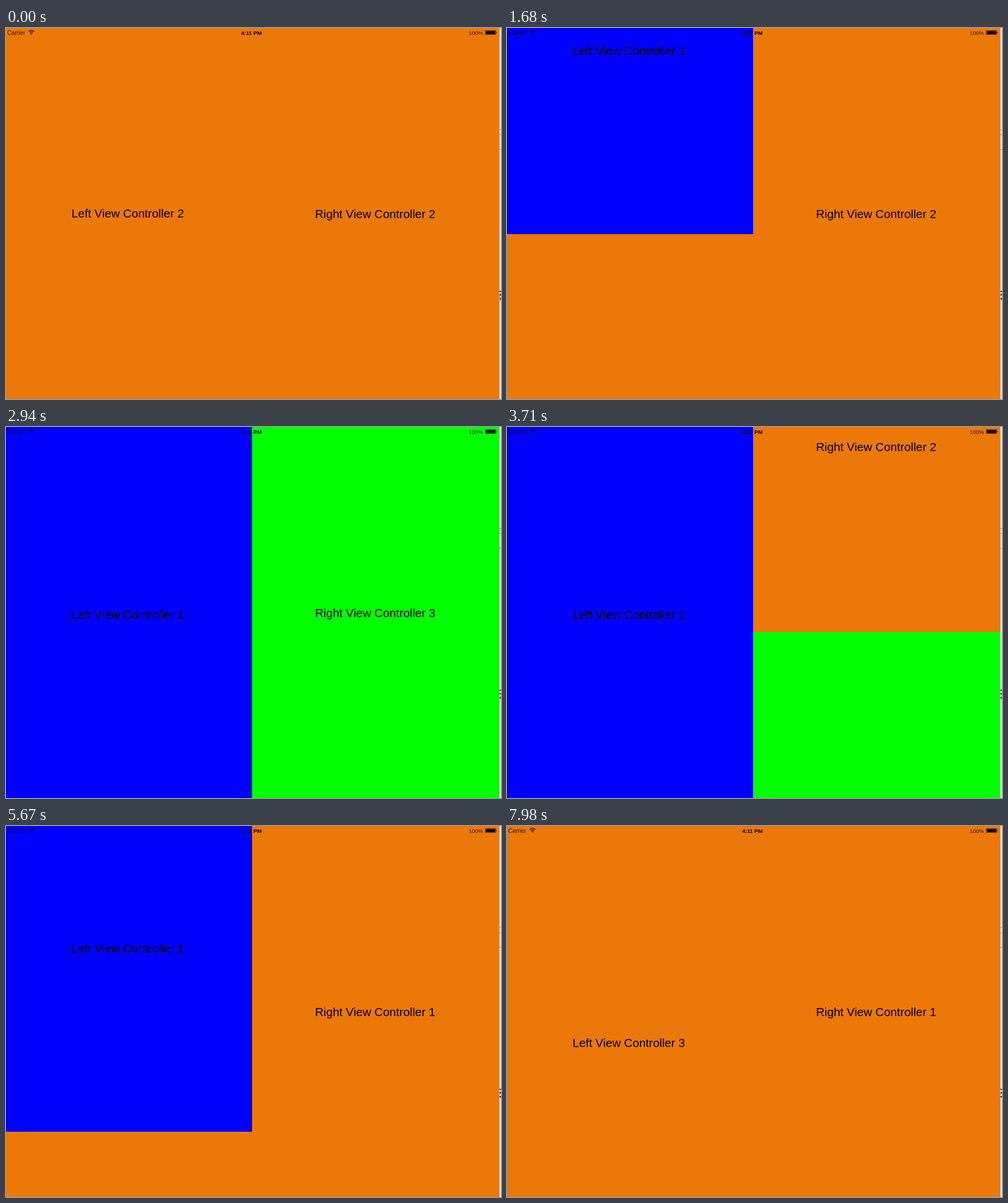
An HTML page with a canvas for the animation above (8000 ms loop, 865 by 648 pixels).

```html
<!DOCTYPE html>
<html lang="en">
<head>
<meta charset="utf-8">
<title>Paged split view</title>
<style>
  html, body { margin: 0; width: 100%; height: 100%; overflow: hidden; }
  canvas { display: block; }
</style>
</head>
<body>
<canvas id="stage" width="865" height="648"></canvas>
<script>
const ctx = document.getElementById('stage').getContext('2d');
const H = 648, LOOP = 8000, TICK = 70;
const ORANGE = '#ec780a', BLUE = '#0000ff', GREEN = '#00ff00';
const FONT = '"Liberation Sans", Arial, sans-serif';

// Slow drags: [tick, distance] points joined by straight lines.
const drag = (...points) => tick => {
  const i = points.findIndex(p => p[0] >= tick);
  if (i < 0) return points[points.length - 1][1];
  if (i === 0) return points[0][1];
  const [t0, d0] = points[i - 1], [t1, d1] = points[i];
  return d0 + (d1 - d0) * (tick - t0) / (t1 - t0);
};

// Quick swipes: one page with a fast start and a soft landing.
const flick = ticks => tick => {
  const v = Math.min(tick / ticks, 1) ** 0.738;
  return H * v * v * (3 - 2 * v);
};

const panes = [
  {
    x: 0, width: 430, textX: 114.5, name: 'Left', first: 1,
    pages: [[BLUE, 334.5], [ORANGE, 331], [ORANGE, 331]],
    moves: [
      { start: 1050, dir: -1, path: drag([0, 0], [1, 12], [9, 308], [10, 360], [12, 494], [13, 556], [14, 603], [15, 634], [16, H]) },
      { start: 5460, dir: 1, path: drag([0, 0], [1, 12], [9, 285], [12, 450], [13, 509], [14, 560], [15, 600], [16, 630], [17, H]) },
      { start: 7140, dir: 1, path: drag([0, 0], [1, 12], [8, 311], [9, 349], [12, 550], [13, 593]) }
    ]
  },
  {
    x: 430, width: 432.5, textX: 540, name: 'Right', first: 1,
    pages: [[ORANGE, 331.5], [ORANGE, 331.5], [GREEN, 331.5]],
    moves: [
      { start: 2450, dir: 1, path: flick(8) },
      { start: 3570, dir: -1, path: flick(7) },
      { start: 4480, dir: -1, path: flick(8) }
    ]
  }
];

function text(string, x, y, size, color = '#000', weight = 'normal') {
  ctx.font = `${weight} ${size}px ${FONT}`;
  ctx.fillStyle = color;
  ctx.fillText(string, x, y);
}

function box(color, x, y, w, h) {
  ctx.fillStyle = color;
  ctx.fillRect(x, y, w, h);
}

function drawPane(pane, time) {
  let scroll = pane.first * H;
  for (const { start, dir, path } of pane.moves) {
    if (time >= start) scroll += dir * path(Math.floor((time - start) / TICK) + 1);
  }
  ctx.save();
  ctx.beginPath();
  ctx.rect(pane.x, 0, pane.width, H);
  ctx.clip();
  pane.pages.forEach(([color, baseline], i) => {
    const top = Math.round(i * H - scroll);
    box(color, pane.x, top, pane.width, H);
    text(`${pane.name} View Controller ${i + 1}`, pane.textX, top + baseline, 20.6);
  });
  ctx.restore();
}

function drawStatusBar() {
  const soft = 'rgba(0,0,0,.8)';
  text('Carrier', 2, 11.5, 10.3, soft);
  text('4:11 PM', 411, 11.5, 9.6, '#000', 'bold');
  text('100%', 808.5, 11.5, 9.8, soft);

  ctx.strokeStyle = ctx.fillStyle = '#000';
  ctx.lineWidth = 1.2;
  for (const radius of [3.6, 6.4]) {
    ctx.beginPath();
    ctx.arc(44.5, 10.5, radius, -Math.PI * 0.77, -Math.PI * 0.23);
    ctx.stroke();
  }
  ctx.beginPath();
  ctx.arc(44.5, 10, 1.2, 0, Math.PI * 2);
  ctx.fill();

  ctx.lineWidth = 0.5;
  ctx.strokeRect(837.5, 4.5, 18.5, 7);
  box('#000', 838.5, 5.3, 16.5, 5.4);
  box('#000', 856.5, 7, 1, 2);
}

function drawEdge() {
  box('#e6e6e6', 862, 0, 3, H);
  for (const y of [177, 186, 212]) box('#777', 862.5, y, 2.5, 1);
  for (const y of [459, 465, 472]) box('#000', 862.5, y, 2.5, 2);
}

function draw(now) {
  const time = now % LOOP;
  drawEdge();
  panes.forEach(pane => drawPane(pane, time));
  drawStatusBar();
  requestAnimationFrame(draw);
}
draw(performance.now());
</script>
</body>
</html>
```
